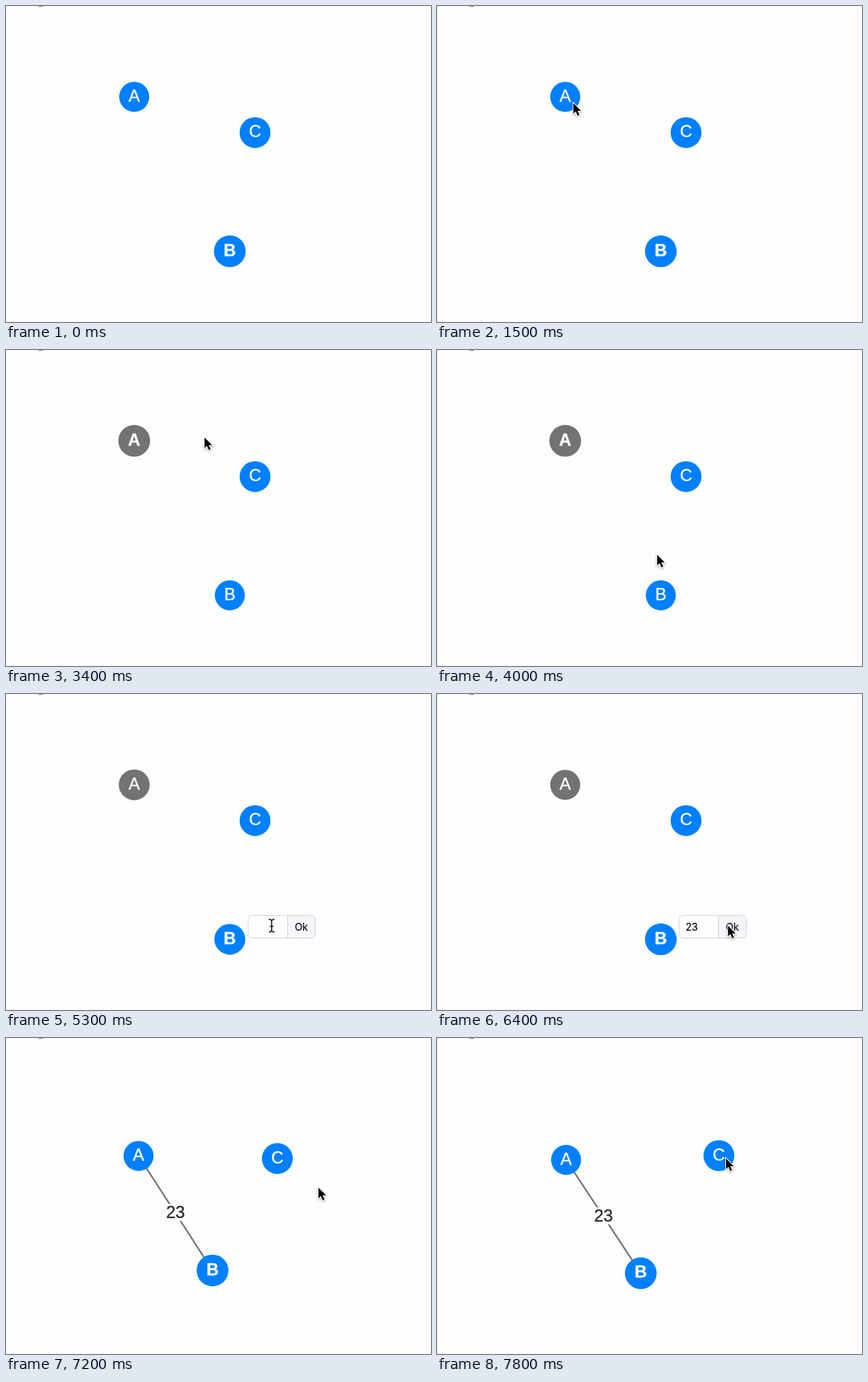
An HTML page with a canvas for the animation above (8000 ms loop, 600 by 446 pixels).

```html
<!DOCTYPE html>
<html lang="en">
<head>
<meta charset="utf-8">
<title>Graph editor</title>
<style>
  html, body { margin: 0; width: 100%; height: 100%; overflow: hidden; background: #fdfdfd; }
  canvas { display: block; }
</style>
</head>
<body>
<canvas id="stage" width="600" height="446"></canvas>
<script>
const ctx = document.getElementById('stage').getContext('2d');
const LOOP = 8000, STEP = 100;
const PAPER = '#fdfdfd', BLUE = '#0080ff', GREY = '#737374', INK = '#1c1c1e';
const SANS = '24px "Liberation Sans", Arial, sans-serif';
const SELECT_A = 2400, LINK_FROM_A = 3000, SELECT_B = 5000, CONFIRM = 6700;
const arrow = new Path2D('M0 0V15L3.4 11.8L6 17.8L8.6 16.7L6 10.9H10.8Z');

// Each move glides the pointer to a stop; bow bends the route sideways.
const moves = [
  { start: 600, span: 500, x: 131, y: 116 },
  { start: 1100, span: 400, x: 192.5, y: 137 },
  { start: 1500, span: 200, x: 188, y: 134 },
  { start: 2200, span: 300, x: 188.5, y: 131 },
  { start: 3100, span: 500, x: 285, y: 123 },
  { start: 3700, span: 900, x: 314, y: 348, bow: 6 },
  { start: 4800, span: 500, x: 375, y: 327 },
  { start: 6000, span: 500, x: 411, y: 327 },
  { start: 6900, span: 900, x: 408, y: 170, bow: 44 }
];

const mix = (a, b, k) => a + (b - a) * k;
const progress = (t, start, span) => Math.min(1, Math.max(0, (t - start) / span));
const easeOut = (u, power) => 1 - (1 - u) ** power;

function pointerAt(t) {
  let x = 388, y = 168;
  for (const move of moves) {
    const k = easeOut(progress(t, move.start, move.span), 3.3);
    x = mix(x, move.x, k) + (move.bow || 0) * Math.sin(Math.PI * k);
    y = mix(y, move.y, k);
  }
  return [x, y];
}

// The hairline stroke gives the glyphs a slightly fuller weight.
function text(label, x, y, font, color, align = 'center') {
  ctx.font = font;
  ctx.fillStyle = ctx.strokeStyle = color;
  ctx.lineWidth = 0.35;
  ctx.textAlign = align;
  ctx.fillText(label, x, y);
  ctx.strokeText(label, x, y);
}

function drawNode(label, [x, y], radius, bold, color = BLUE) {
  ctx.fillStyle = color;
  ctx.beginPath();
  ctx.arc(x, y, radius, 0, Math.PI * 2);
  ctx.fill();
  text(label, x, y + 6.5, (bold ? 'bold ' : '') + SANS, '#fff');
}

function drawEdge(a, b, [x, y]) {
  ctx.strokeStyle = '#757575';
  ctx.lineWidth = 2.3;
  ctx.beginPath();
  ctx.moveTo(...a);
  ctx.lineTo(...b);
  ctx.stroke();
  ctx.fillStyle = PAPER;
  ctx.fillRect(x - 14, y - 13, 28, 24);
  text('23', x, y + 6.5, SANS, '#2b2b2b');
}

function drawPrompt(typed) {
  ctx.beginPath();
  ctx.roundRect(342, 312.5, 94.5, 32, 5);
  ctx.save();
  ctx.clip();
  ctx.fillStyle = '#fefefe';
  ctx.fillRect(342, 312, 55, 33);
  ctx.fillStyle = '#f4f5f8';
  ctx.fillRect(397, 312, 40, 33);
  ctx.fillStyle = '#d3d4d8';
  ctx.fillRect(397, 312, 1, 33);
  ctx.restore();
  ctx.strokeStyle = '#d3d4d8';
  ctx.lineWidth = 1;
  ctx.stroke();
  text('Ok', 417, 333.5, '14px Inter, sans-serif', INK);
  text(typed, 351, 333.5, '14px Inter, sans-serif', INK, 'left');
}

function drawArrow() {
  ctx.shadowColor = 'rgba(0,0,0,.3)';
  ctx.shadowBlur = 3;
  ctx.shadowOffsetY = 1.5;
  ctx.strokeStyle = '#fff';
  ctx.lineWidth = 2;
  ctx.stroke(arrow);
  ctx.shadowColor = 'transparent';
  ctx.fillStyle = '#000';
  ctx.fill(arrow);
}

function drawIBeam() {
  ctx.strokeStyle = '#111';
  ctx.lineWidth = 1.5;
  ctx.beginPath();
  for (const side of [-1, 1]) {
    for (const end of [-1, 1]) {
      ctx.moveTo(side * 4, end * 9);
      ctx.quadraticCurveTo(0, end * 9, 0, end * 6);
    }
  }
  ctx.moveTo(0, -6);
  ctx.lineTo(0, 6);
  ctx.moveTo(-2.5, 1);
  ctx.lineTo(2.5, 1);
  ctx.stroke();
}

function draw(t) {
  ctx.fillStyle = PAPER;
  ctx.fillRect(0, 0, 600, 446);
  ctx.fillStyle = '#777';
  ctx.fillRect(46, 0, 6, 1);

  // The new edge shortens like a damped spring while the layout drifts and turns.
  const drift = easeOut(progress(t, CONFIRM, 900), 1.4);
  const pull = 1 - Math.exp(-Math.max(0, t - CONFIRM) / 115);
  const half = mix(128.2, 95.8, pull), angle = mix(1.0165, 0.988, drift);
  const dx = half * Math.cos(angle), dy = half * Math.sin(angle);
  const mid = [mix(248.5, 235, drift), mix(237.2, 252, drift)];
  const a = [mid[0] - dx, mid[1] - dy], b = [mid[0] + dx, mid[1] + dy];
  const c = [mix(351.6, 398, drift), mix(178.7, 166, drift)];

  const grow = progress(t, SELECT_A, 600) - progress(t, SELECT_B, 600);
  const boldA = t >= SELECT_A && t < SELECT_B;
  const linking = t >= LINK_FROM_A && t <= CONFIRM;

  if (t > CONFIRM) drawEdge(a, b, mid);
  drawNode('A', a, mix(21.2, 22.4, grow), boldA, linking ? GREY : BLUE);
  drawNode('B', b, mix(22.4, 21.2, grow), !boldA);
  drawNode('C', c, 21.8, false);

  if (t > SELECT_B && t < CONFIRM) {
    drawPrompt('23'.slice(0, Math.max(0, Math.floor((t - 5700) / 200))));
  }
  if (t >= 300) {
    ctx.save();
    ctx.translate(...pointerAt(t));
    if (t >= 5200 && t < 6200) drawIBeam();
    else drawArrow();
    ctx.restore();
  }
}

function tick() {
  draw(Math.floor(performance.now() % LOOP / STEP) * STEP);
  requestAnimationFrame(tick);
}
tick();
</script>
</body>
</html>
```
